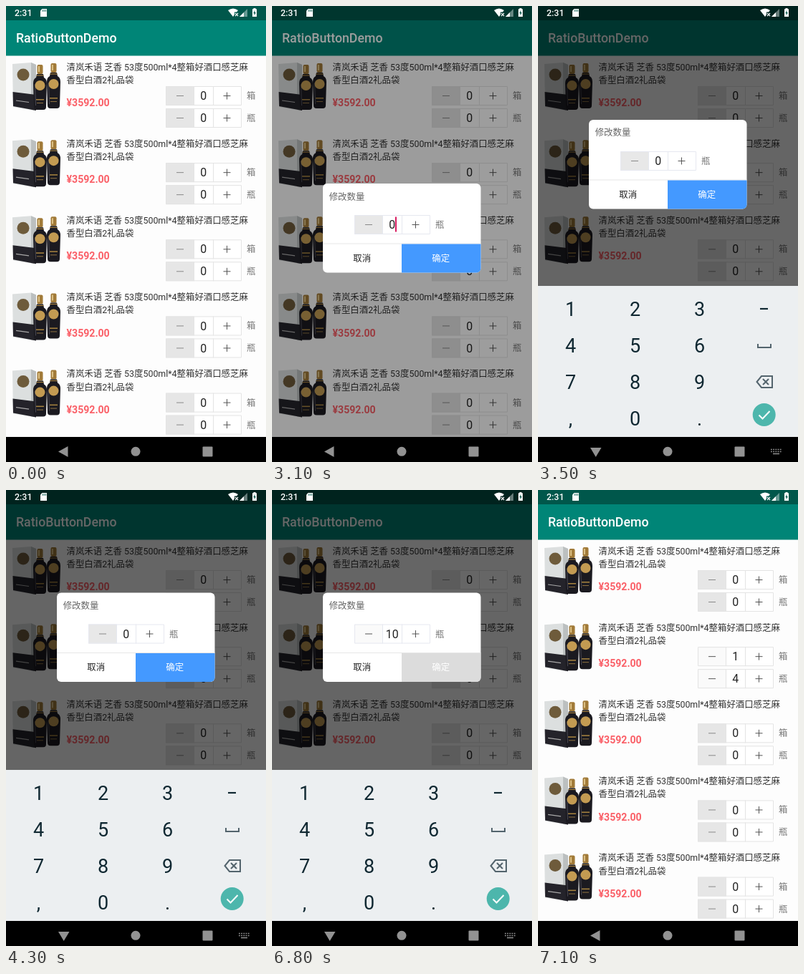
Animation of 363 by 637 pixels, one loop 9 s. Source, as an HTML page:

```html
<!DOCTYPE html>
<html lang="zh-CN">
<head>
<meta charset="utf-8">
<title>RatioButtonDemo</title>
<style>
html, body { margin: 0; width: 100%; height: 100%; overflow: hidden; background: #000; }
svg { display: block; width: 100vw; height: 100vh; }
text { font-family: Roboto, "Noto Sans CJK SC", "Noto Sans CJK", sans-serif; white-space: pre; }
</style>
</head>
<body>
<svg id="stage" viewBox="0 0 363 637"></svg>
<script>
const LOOP = 9000, STEP = 100;
const BODY = 12.42, DIGIT = 15.9;
const NAV_TOP = 602;
const stage = document.getElementById('stage');

const clamp = v => Math.max(0, Math.min(1, v));
const progress = (t, from, to) => clamp((t - from) / (to - from));
const easeInOut = p => p < .5 ? 4 * p ** 3 : 1 - 4 * (1 - p) ** 3;
const within = (t, from, to) => t >= from && t < to;

const rect = (x, y, w, h, fill, extra = '') =>
  `<rect x="${x}" y="${y}" width="${w}" height="${h}" fill="${fill}" ${extra}/>`;
const circle = (x, y, r, fill) => `<circle cx="${x}" cy="${y}" r="${r}" fill="${fill}"/>`;
const path = (d, fill, extra = '') => `<path d="${d}" fill="${fill}" ${extra}/>`;
const line = (d, color, width = 1, extra = '') =>
  path(d, 'none', `stroke="${color}" stroke-width="${width}" ${extra}`);
const text = (s, x, y, size, fill, extra = '') =>
  `<text x="${x}" y="${y}" font-size="${size}" fill="${fill}" ${extra}>${s}</text>`;
const centered = (s, x, y, size, fill) => text(s, x, y, size, fill, 'text-anchor="middle"');
const group = (x, y, content, opacity = 1) =>
  `<g transform="translate(${x} ${y})" opacity="${opacity}">${content}</g>`;

function counter(x, y, value, unit, enabled, gray = '#e6e6e6', edge = '#e4e4e4') {
  return group(x, y,
    rect(.5, .5, 105, 26, '#fff') +
    rect(0, 0, 39, 27, enabled ? '#fafafa' : gray) +
    line('M.5 .5H105.5V26.5H.5ZM39.5 0V27M66.5 0V27', edge) +
    line('M15 13.5H25', enabled ? '#555' : '#888') +
    line('M80.5 13.5H90.5M85.5 8.5V18.5', '#555') +
    centered(value, 52.8, 19.2, DIGIT, '#222') +
    text(unit, 113, 18, BODY, '#777'));
}

// Stylised product: a silver gift box and two dark bottles
const bottle = (x, y) => group(x, y,
  rect(6.5, 0, 8, 13, '#a17a38', 'rx="2"') +
  rect(8, 2, 2, 8, '#dcc084') +
  path('M6 13H15L16 18Q20 20 20 26L19 59Q19 63 15 63H6Q2 63 2 59L1 26Q1 20 5 18Z', '#1b1a20') +
  line('M5.5 15H15.5', '#b98f45') +
  line('M3.5 27L4.5 57', '#4a4954') +
  circle(10.5, 29, 7, '#c39b52') +
  rect(5, 48, 11, 1.5, '#a8843f') +
  rect(6, 53, 9, 1, '#8d7040'));
const product =
  path('M9 12L35 10L42 13V77L10 72Z', '#dcdfdf') +
  path('M35 10L42 13V77L35 76Z', '#bcc0c0') +
  path('M9.5 51L42 55V77L10 71Z', '#24232a') +
  circle(24, 27, 8.5, '#6e5b3b') +
  line('M14 63L32 65.5', '#a8a8a8', 1.2) +
  bottle(37, 13) + bottle(56, 11);

function productRow(index, boxes, bottles) {
  const enabled = boxes + bottles > 0;
  return group(0, 69 + index * 107.15,
    product +
    text('清岚禾语 芝香 53度500ml*4整箱好酒口感芝麻', 84.5, 20.7, BODY, '#333') +
    text('香型白酒2礼品袋', 84.5, 39, BODY, '#333') +
    text('¥3592.00', 84.5, 71.2, 14.1, '#fa6068', 'font-weight="700"') +
    counter(223, 43, boxes, '箱', enabled) +
    counter(223, 74, bottles, '瓶', enabled));
}

function statusIcons() {
  return text('2:31', 12, 14.3, BODY, '#fff', 'font-weight="500"') +
    path('M50.5 4H57V15H48V6.5Z', '#fff') +
    line('M51.5 5V8M53.5 5V8M55.5 5V8', '#00574b', .8) +
    path('M310 6Q317 1 324 6L322 8.5H319V12L317 15Z', '#fff') +
    line('M320 10L324 14M324 10L320 14', '#fff', 1.2) +
    path('M337 4V15H326Z', '#fff', 'opacity=".4"') +
    path('M332 9V15H326Z', '#fff') +
    path('M345.5 3H348.5V4.3H350V15H344V4.3H345.5Z', '#fff') +
    path('M347.5 6L345.3 10.3H346.7V13.2L348.8 9H347.5Z', '#00574b');
}

function navBar(typing) {
  const gray = '#929292';
  const base = rect(0, NAV_TOP, 363, 637 - NAV_TOP, '#000') +
    path(typing ? 'M73 617H88.5L80.7 630Z' : 'M86.5 615V630L73 622.5Z', gray) +
    circle(181, 622.3, 6.5, gray) +
    rect(274.5, 615.5, 14, 14, gray, 'rx="1"');
  if (!typing) return base;
  return base +
    line('M325 619.5H340M325 622.5H340', gray, 1.5, 'stroke-dasharray="1.8 1.4"') +
    line('M328 625.5H337', gray, 1.5);
}

function keyboard(shown) {
  if (!shown) return '';
  const ink = '#102832', iconInk = '#53646d';
  const keys = ['123', '456', '789', ',0.'].map((row, r) =>
    [...row].map((key, c) => centered(key, 45.5 + 90 * c, 42 + 51 * r, 27, ink)).join('')).join('');
  return group(0, 391 + (1 - shown) * 42,
    rect(0, 0, 363, 211, '#eceff1') + keys +
    line('M310 32H321', ink, 2.2) +
    line('M307 81V86H325V81', iconInk, 2) +
    line('M312 126H327V142H312L305.5 134Z', iconInk, 2) +
    line('M314 130L322 138M322 130L314 138', iconInk, 2) +
    circle(315.7, 180, 16, '#4db6ac') +
    line('M308.5 180.5L313.5 185.5L323.5 175', '#fff', 2), shown);
}

function dialog(y, value, cursorOn, pressed, opacity) {
  const textEnd = 97 + value.length * DIGIT * .281;
  return group(71, y,
    rect(0, 0, 220.5, 124.5, '#fff', 'rx="6"') +
    text('修改数量', 8.7, 22.5, BODY, '#666') +
    counter(44, 44, value, '瓶', Number(value) > 0, '#e8e8e8', '#e6e8f0') +
    (cursorOn ? rect(textEnd - .5, 46.5, 2, 21, '#d81b60') : '') +
    line('M0 84H220.5', '#e6e6e6') +
    path('M110 84.5H220.5V118.5A6 6 0 0 1 214.5 124.5H110Z', pressed ? '#dcdcdc' : '#4499ff') +
    centered('取消', 54.7, 108.7, BODY, '#222') +
    centered('确定', 164.7, 108.7, BODY, '#fff'), opacity);
}

const cursorSpans = [[3000, 3500], [3800, 4300], [4600, 5900], [6300, 6800]];

function scene(t) {
  const open = within(t, 3000, 7000);
  const fadeOut = 1 - progress(t, 6800, 7100);
  const dim = .6 * progress(t, 2920, 3200) * fadeOut;
  const keyboardShown = t < 3400 ? 0 : (t < 3500 ? .7 : 1) * fadeOut;
  const dialogY = 248 - 104.5 * easeInOut(progress(t, 3300, 3600));
  const value = t < 4600 ? '0' : t < 5100 ? '' : t < 5400 ? '1' : '10';
  const cursorOn = cursorSpans.some(([from, to]) => within(t, from, to));
  const total = t < 6900 ? 0 : 10;

  let rows = '';
  for (let i = 0; i < 5; i++) {
    const amount = i === 1 ? total : 0;
    rows += productRow(i, Math.floor(amount / 6), amount % 6);
  }
  return rect(0, 0, 363, NAV_TOP, '#fdfdfd') + rows +
    rect(0, 0, 363, 20, '#00574b') + rect(0, 20, 363, 49.5, '#008577') +
    text('RatioButtonDemo', 14, 51.2, 17.75, '#fff', 'font-weight="500"') +
    rect(0, 0, 363, NAV_TOP, '#000', `opacity="${dim}"`) +
    statusIcons() +
    (open ? dialog(dialogY, value, cursorOn, t >= 6800, 1 - progress(t, 6800, 6950)) : '') +
    keyboard(keyboardShown) +
    navBar(within(t, 3200, 7000));
}

let start, shownStep;
function tick(now) {
  start ??= now;
  const step = Math.floor((now - start) % LOOP / STEP);
  if (step !== shownStep) {
    shownStep = step;
    stage.innerHTML = scene(step * STEP);
  }
  requestAnimationFrame(tick);
}
stage.innerHTML = scene(0);
requestAnimationFrame(tick);
</script>
</body>
</html>
```
